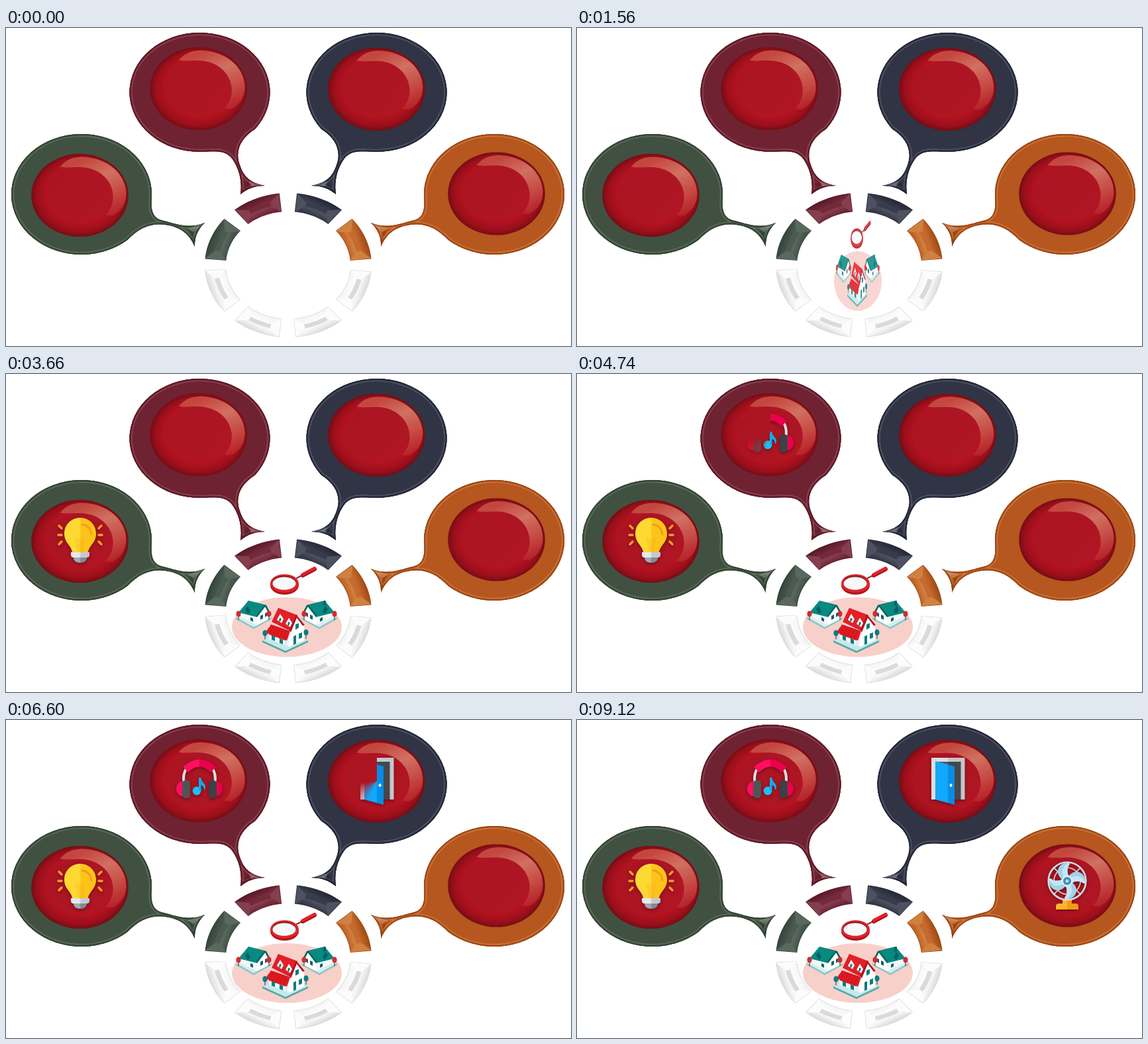
An HTML page with a canvas for the animation above (9.18 s loop, 853 px wide and 480 px high).

```html
<!DOCTYPE html>
<html lang="en">
<head>
<meta charset="utf-8">
<title>Home devices</title>
<style>
  html, body { margin: 0; width: 100%; height: 100%; overflow: hidden; background: #fff; }
  canvas { display: block; width: 100vw; height: 100vh; }
</style>
</head>
<body>
<canvas id="stage" width="853" height="480"></canvas>
<script>
const W = 853, H = 480, LOOP = 9180, STEP = 60;
const SPAN = 1820;        // length of each entrance
const SOFT = 60;          // soft edge of the wheel wipe, in degrees
const TAU = Math.PI * 2, RAD = Math.PI / 180;

function layer(w = W, h = H) {
  const c = document.createElement('canvas');
  c.width = w;
  c.height = h;
  return c.getContext('2d');
}

function shape(g, d, fill) {
  g.fillStyle = fill;
  g.fill(new Path2D(d));
}

function line(g, d, color, width, cap = 'round') {
  g.strokeStyle = color;
  g.lineWidth = width;
  g.lineCap = cap;
  g.stroke(new Path2D(d));
}

function oval(g, x, y, rx, ry, fill) {
  g.beginPath();
  g.ellipse(x, y, rx, ry, 0, 0, TAU);
  g.fillStyle = fill;
  g.fill();
}

function blend(g, x0, y0, x1, y1, ...colors) {
  const f = g.createLinearGradient(x0, y0, x1, y1);
  colors.forEach((c, i) => f.addColorStop(i / (colors.length - 1), c));
  return f;
}

function mirror(g, axis, draw) {
  g.save();
  g.translate(axis * 2, 0);
  g.scale(-1, 1);
  draw();
  g.restore();
}

// Bubbles with tails

function sidePath() {
  const p = new Path2D();
  p.ellipse(114, 251, 106, 91, 0, 49 * RAD, 363 * RAD);
  p.bezierCurveTo(218, 276, 222, 288, 238, 291);
  p.bezierCurveTo(258, 296, 276, 304, 300, 294);
  p.quadraticCurveTo(284, 309, 285, 330);
  p.bezierCurveTo(277, 311, 264, 301, 244, 297.5);
  p.bezierCurveTo(222, 293, 202, 300, 183.5, 319.7);
  p.closePath();
  return p;
}

function topPath() {
  const p = new Path2D();
  p.ellipse(292.5, 97, 106, 90, 0, 84 * RAD, 398 * RAD);
  p.bezierCurveTo(354, 166, 345, 186, 353, 207);
  p.bezierCurveTo(359, 225, 369, 234, 391, 238);
  p.quadraticCurveTo(369, 238, 354, 251);
  p.bezierCurveTo(357, 232, 352, 212, 342, 198);
  p.bezierCurveTo(333, 185, 318, 186, 303.6, 186.5);
  p.closePath();
  return p;
}

function bubble(g, path, facet, base, dark, light) {
  g.save();
  g.fillStyle = base;
  g.fill(path);
  g.clip(path);
  for (const [color, width] of [[light, 8], [base, 5.8], [dark, 2.4]]) {
    g.strokeStyle = color;
    g.lineWidth = width;
    g.stroke(path);
  }
  shape(g, facet[0], 'rgba(255,255,255,.2)');
  shape(g, facet[1], 'rgba(0,0,0,.16)');
  g.restore();
}

function button(g, x, y) {
  g.save();
  g.translate(x, y);
  g.scale(73.3, 62.6);
  const f = g.createRadialGradient(.06, -.06, .5, 0, 0, 1);
  f.addColorStop(0, '#bd1523');
  f.addColorStop(.4, '#b51320');
  f.addColorStop(.8, '#9a0f1b');
  f.addColorStop(1, '#760c14');
  oval(g, 0, 0, 1, 1, f);
  g.restore();

  g.save();
  g.translate(x, y);
  oval(g, 0, -1, 50, 41.5, blend(g, -40, -35, 40, 35, '#ab1422', '#b01624'));
  shape(g, 'M-30 -43 C-20 -55 -8 -58 4 -58 C42 -57 70 -32 70 -2 C70 14 61 25 49 31 L39 30 C47 21 51 11 50 -1 C48 -25 27 -42 1 -42.5 C-10 -43 -20 -41 -30 -43 Z',
    blend(g, 15, -57, 55, 32, '#c4473f', '#d07161', '#c64a43', '#b31c26'));
  g.restore();
}

// Beveled ring segments

const RING = { x: 426, y: 358 };

function ringPoint(deg, depth) {
  const rx = 126 - 32 * depth, ry = 109 - 28 * depth;
  return [RING.x + rx * Math.cos(deg * RAD), RING.y + ry * Math.sin(deg * RAD)];
}

function band(g, a0, a1, d0, d1, fill) {
  g.beginPath();
  for (let i = 0; i <= 12; i++) g.lineTo(...ringPoint(a0 + (a1 - a0) * i / 12, d0));
  for (let i = 12; i >= 0; i--) g.lineTo(...ringPoint(a0 + (a1 - a0) * i / 12, d1));
  g.closePath();
  g.fillStyle = fill;
  g.fill();
}

function endFacet(g, a, inner, fill) {
  g.beginPath();
  g.moveTo(...ringPoint(a, 0));
  g.lineTo(...ringPoint(inner, .42));
  g.lineTo(...ringPoint(inner, .62));
  g.lineTo(...ringPoint(a, 1));
  g.closePath();
  g.fillStyle = fill;
  g.fill();
}

function segment(g, a0, a1, [base, dark, light, strip]) {
  const mid = (a0 + a1) / 2;
  band(g, a0, a1, 0, 1, dark);
  band(g, a0 + .5, a1 - .5, .03, .97, blend(g, ...ringPoint(mid, 0), ...ringPoint(mid, 1), dark, base, light, base));
  endFacet(g, a0 + .5, a0 + 8, light);
  endFacet(g, a1 - .5, a1 - 8, light);
  band(g, a0 + 8, a1 - 8, .4, .62, strip);
}

function drawBase(g) {
  g.fillStyle = '#fff';
  g.fillRect(0, 0, W, H);
  const side = sidePath(), top = topPath();
  const sideFacet = ['M274 303 L300 294 L283 308 Z', 'M276 304 L283 308 L285 330 Z'];
  const topFacet = ['M366 231 L391 238 L370 239 Z', 'M365 232 L370 239 L354 251 Z'];
  bubble(g, side, sideFacet, '#405141', '#2f3e31', '#66745f');
  bubble(g, top, topFacet, '#6f2231', '#531825', '#92505c');
  mirror(g, 426, () => bubble(g, top, topFacet, '#303444', '#20232f', '#5a5e6e'));
  mirror(g, 425.5, () => bubble(g, side, sideFacet, '#b5571e', '#8f4212', '#cd7d45'));
  [[111.5, 252.5], [290.7, 91.7], [559.3, 92.3], [740.5, 250]].forEach(p => button(g, ...p));

  const white = ['#f5f5f5', '#d9dadb', '#fcfcfc', '#d8dbda'];
  segment(g, 185, 220, ['#43534a', '#34443a', '#5a695e', '#4b5b50']);
  segment(g, 230, 264, ['#702537', '#571a29', '#843f4f', '#742a3b']);
  segment(g, 276, 310, ['#343847', '#252936', '#4d5160', '#383c4c']);
  segment(g, 320, 355, ['#bf6226', '#9c4a16', '#d0803f', '#c56a30']);
  [[5, 40], [50, 85], [96, 130], [140, 176]].forEach(a => segment(g, ...a, white));
}

// Village with magnifier

function tree(g, x, y, color) {
  line(g, `M${x} ${y} V${y + 9}`, '#35545a', 1.2);
  oval(g, x, y, 3.6, 4.6, color);
}

function cottage(g) {
  shape(g, 'M347 367 L373 353 L401 367 V370 L374 385 L347 370 Z', '#8fc5c6');
  shape(g, 'M347 367 L373 353 L401 367 L374 382 Z', '#d5efee');
  shape(g, 'M354 358 L379 366 V379 L354 367 Z', '#f4f7f8');
  shape(g, 'M379 366 L391 348 L397 361 V370 L379 379 Z', '#fff');
  shape(g, 'M351 360 L366 342 L393 349 L379 367 Z', '#078a80');
  shape(g, 'M366 342 L393 349 L400 362 L397 362 L391 351 L379 367 L378 364 L390 349 Z', '#05665f');
  shape(g, 'M361 355 L365 350 L369 359 L365 362 Z', '#0a5f67');
  shape(g, 'M384 365 L388 363 V369 L384 371 Z M391 361 L394 360 V365 L391 367 Z M369 367 L373 369 V374 L369 372 Z', '#155e69');
  tree(g, 351, 362, '#d62b2f');
  tree(g, 397, 362, '#d62b2f');
}

function villa(g) {
  shape(g, 'M387 402 L422 383 L456 402 V405 L422 421 L387 405 Z', '#56a9aa');
  shape(g, 'M387 402 L422 383 L456 402 L422 418 Z', '#c5e9e8');
  shape(g, 'M397 379 L428 387 V412 L397 400 Z', '#eff4f6');
  shape(g, 'M427 389 L439 364 L450 379 V402 L427 412 Z', '#fff');
  shape(g, 'M401 374 L411 353 L440 364 L429 388 Z', '#e31f27');
  shape(g, 'M438 363 L451 379 L448 380 L439 368 L430 390 L428 386 Z', '#ad141d');
  shape(g, 'M391 391 L400 378 L429 388 L424 403 Z', '#df1921');
  for (let i = 1; i < 6; i++) {
    line(g, `M${400 + i * 4.8} ${378 + i * 1.7} L${391 + i * 5.5} ${391 + i * 2}`, '#b5131b', .7);
  }
  for (const [x, y] of [[414, 368], [427, 374]]) {
    shape(g, `M${x - 5} ${y + 3} L${x} ${y - 6} L${x + 5} ${y + 2} L${x + 2} ${y + 8} Z`, '#fff');
    shape(g, `M${x - 1} ${y} L${x + 2} ${y + 1} L${x} ${y + 6} L${x - 2} ${y + 5} Z`, '#16717a');
  }
  shape(g, 'M437 378 L442 376 V383 L437 386 Z M434 396 L438 394 V407 L434 409 Z M442 392 L447 390 V398 L442 400 Z', '#087b7d');
  shape(g, 'M401 394 L406 396 V403 L401 401 Z M413 399 L418 401 V408 L413 406 Z', '#087b7d');
  line(g, 'M396 392 V403 M423 402 V413', '#d8e4e7', 1.6);
  tree(g, 391, 391, '#087c83');
  tree(g, 453, 390, '#087c83');
}

function drawVillage(g) {
  oval(g, 424, 382, 83, 45, '#f8d0ca');
  cottage(g);
  mirror(g, 423.5, () => cottage(g));
  shape(g, 'M479 343 L483 342 V349 L479 350 Z', '#155e69');
  villa(g);

  line(g, 'M439 308 L447 304', '#85383a', 2.5);
  line(g, 'M448 304 L466 294.5', '#a9131b', 6);
  line(g, 'M448 302.5 L466 293', '#e5222a', 4.4);
  oval(g, 420.5, 319, 21.5, 14, '#b2151d');
  oval(g, 420.5, 316, 21.5, 13.8, '#e3222a');
  oval(g, 420, 315, 18, 10.8, '#8b2226');
  oval(g, 420, 316.2, 17.5, 9.6, '#f7f8f8');
}

// Icons, each drawn around its own centre

function bulb(g) {
  const globe = 'M-12 17 C-13 7 -24 3 -24 -11 C-24 -25 -13 -35 0 -35 C13 -35 24 -25 24 -11 C24 3 13 7 12 17 Z';
  shape(g, globe, blend(g, -1, 0, 1, 0, '#fed933', '#fcc419'));
  shape(g, 'M-8 -6 L0 -2 L8 -6 L4 17 H-4 Z', 'rgba(240,160,25,.2)');
  line(g, 'M3 -25 C11 -24 16 -18 17 -10', '#f69b20', 3);
  shape(g, 'M-14 17 H14 V21 Q14 25 10 25 H-10 Q-14 25 -14 21 Z', blend(g, -1, 0, 1, 0, '#e5e8ed', '#c4c8d0'));
  shape(g, 'M-10 25 H10 C10 30 6 33 0 33 C-6 33 -10 30 -10 25 Z', blend(g, -1, 0, 1, 0, '#a2a8b2', '#828995'));
  for (const s of [-1, 1]) {
    line(g, `M${s * 28} -19 L${s * 32} -23 M${s * 28} -9 H${s * 33} M${s * 28} 1 L${s * 32} 5`, '#f5a021', 3.4);
  }
}

function headphones(g) {
  line(g, 'M-23 6 C-26 -5 -21 -17 -15 -21 M23 6 C26 -5 21 -17 15 -21', '#dedede', 4);
  line(g, 'M-21 -14 Q0 -34 21 -14', blend(g, -1, 0, 1, 0, '#ff0f5f', '#ea004d'), 11, 'butt');
  for (const s of [-1, 1]) {
    oval(g, s * 26, 15, 9, 11, s < 0 ? '#ff0f5f' : '#e9004c');
    g.beginPath();
    g.roundRect(s * 20 - 6, 2, 12, 27, 5);
    g.fillStyle = s < 0 ? '#505459' : '#3d4146';
    g.fill();
  }
  oval(g, -4, 18, 6.3, 6.5, '#1ac1f5');
  shape(g, 'M-1 18 V-2 H2.5 C2 5 10 6 9 14 L7 17 C7 11 4 10 2.5 9 V18 Z', '#0dadeb');
}

function door(g) {
  shape(g, 'M-25 -35 H25.5 V28 H-25 Z', blend(g, -1, 0, 1, 0, '#dbdde0', '#c3c6ca'));
  shape(g, 'M-19 -29 H19.5 V28 H-19 Z', blend(g, -1, 0, 1, 0, '#57595d', '#45474b'));
  shape(g, 'M-19 -30 L10 -22 V36 L-19 28 Z', blend(g, -1, 0, 1, 0, '#12a8fb', '#078de5'));
  oval(g, 4.5, 6.5, 2, 2.6, '#f7f9ff');
}

function fan(g) {
  shape(g, 'M-7 20 H7 V27 H12 Q17 27 17 31 V36 H-17 V31 Q-17 27 -12 27 H-7 Z', blend(g, -1, 0, 1, 0, '#ffb42b', '#f39a18'));
  g.save();
  g.translate(0, -7);
  g.strokeStyle = '#d5dbe0';
  g.lineWidth = 2.6;
  g.beginPath();
  g.arc(0, 0, 28.3, 0, TAU);
  g.stroke();
  g.lineWidth = 1.6;
  g.beginPath();
  g.arc(0, 0, 20, 0, TAU);
  g.stroke();
  for (let i = 0; i < 8; i++) {
    g.rotate(TAU / 8);
    line(g, 'M8 0 H27', '#d5dbe0', 1.6);
  }
  for (let i = 0; i < 4; i++) {
    shape(g, 'M-6 -2 C-18 -8 -17 -27 2 -27.5 C5 -27 4 -25 2 -22 C-2 -16 0 -10 6 -5 Z', '#c3e6f4');
    shape(g, 'M-6 -2 C-18 -8 -17 -27 2 -27.5 C-9 -22 -10 -9 -2 -4 Z', '#9fd3ea');
    g.rotate(TAU / 4);
  }
  oval(g, 0, 0, 8.5, 8.5, '#d9eef8');
  oval(g, 0, 0, 6, 6, '#3f8db8');
  oval(g, 0, 0, 2.6, 2.6, '#a6def3');
  g.restore();
}

const BOX = 96;

function makeIcon(draw, x, y) {
  const raw = layer(BOX, BOX), lit = layer(BOX, BOX);
  raw.translate(BOX / 2, BOX / 2);
  draw(raw);
  lit.shadowColor = 'rgba(0,0,0,.35)';
  lit.shadowBlur = 5;
  lit.shadowOffsetY = 2;
  lit.drawImage(raw.canvas, 0, 0);
  return { art: lit.canvas, x, y };
}

const base = layer(), village = layer(), wipe = layer(BOX, BOX);
drawBase(base);
drawVillage(village);
const icons = [
  makeIcon(bulb, 112, 252),
  makeIcon(headphones, 292, 89),
  makeIcon(door, 560, 92),
  makeIcon(fan, 740, 250)
];
const stage = document.getElementById('stage').getContext('2d');
const clamp = v => Math.min(1, Math.max(0, v));

function swivel(p) {
  if (p <= 0) return;
  stage.save();
  stage.globalAlpha = p;
  stage.translate(424, 0);
  stage.scale(Math.sin(2.5 * Math.PI * p), 1);
  stage.translate(-424, 0);
  stage.drawImage(village.canvas, 0, 0);
  stage.restore();
}

function wheel(icon, p) {
  if (p <= 0) return;
  let art = icon.art;
  if (p < 1) {
    const lead = p * (360 + SOFT);
    const mask = wipe.createConicGradient(-Math.PI / 2, BOX / 2, BOX / 2);
    for (const deg of [0, lead - SOFT, lead, 360]) {
      if (deg < 0 || deg > 360) continue;
      mask.addColorStop(deg / 360, `rgba(0,0,0,${clamp((lead - deg) / SOFT)})`);
    }
    wipe.globalCompositeOperation = 'copy';
    wipe.drawImage(art, 0, 0);
    wipe.globalCompositeOperation = 'destination-in';
    wipe.fillStyle = mask;
    wipe.fillRect(0, 0, BOX, BOX);
    art = wipe.canvas;
  }
  stage.drawImage(art, icon.x - BOX / 2, icon.y - BOX / 2);
}

function frame() {
  const t = Math.floor(performance.now() % LOOP / STEP) * STEP;
  stage.drawImage(base.canvas, 0, 0);
  swivel(clamp(t / SPAN));
  icons.forEach((icon, i) => wheel(icon, clamp(t / SPAN - 1 - i)));
  requestAnimationFrame(frame);
}
frame();
</script>
</body>
</html>
```
